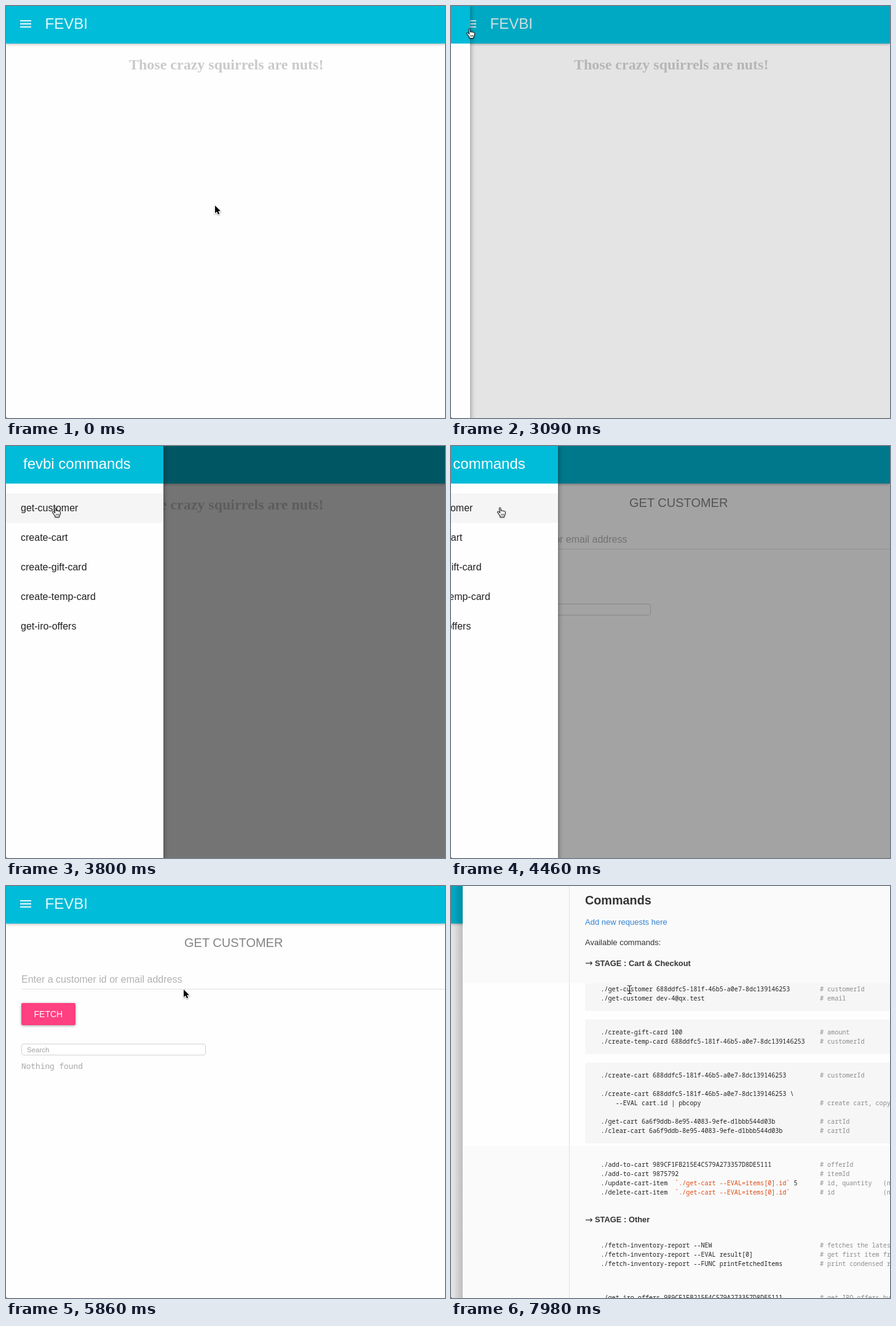
Recreate the animation shown at these times as an HTML page. Size 714 by 669 pixels, loop 8000 ms.

```html
<!DOCTYPE html>
<html lang="en">
<head>
<meta charset="utf-8">
<title>Command drawer</title>
<style>
  html, body { margin: 0; width: 100%; height: 100%; overflow: hidden; background: #fefefe; }
  svg { display: block; width: 714px; height: 669px; }
  text { font-family: "Liberation Sans", Arial, sans-serif; white-space: pre; }
  .title { font-size: 24px; fill: #fff; }
  .items { font-size: 16px; fill: #212121; }
  .serif { font: bold 24px "Liberation Serif", Times, serif; fill: #cacaca; }
  .mono { font-family: "Noto Sans Mono", monospace; }
  .doc { font-size: 13px; fill: #333; }
  .bold { font-size: 12.9px; font-weight: bold; }
  .pointer { font: 15px "DejaVu Sans", sans-serif; fill: #333; }
  .code { font-size: 10.07px; font-weight: 500; fill: #222; }
  .code .eval { fill: #dd4a14; }
  .code.note { fill: #8c8c8c; }
  .bar { fill: #00bcd9; }
  .bar.raised { filter: drop-shadow(0 1px 2px rgba(0, 0, 0, .3)); }
  .panel { fill: #fefefe; filter: drop-shadow(0 3px 4px rgba(0, 0, 0, .45)); }
  .button { fill: #ff4081; filter: drop-shadow(0 1px 2px rgba(0, 0, 0, .35)); }
  .cursor { filter: drop-shadow(0 1px 1px rgba(0, 0, 0, .35)); }
</style>
</head>
<body>
<svg viewBox="0 0 714 669">
  <defs>
    <linearGradient id="edgeShade">
      <stop offset="0" stop-opacity="0"/>
      <stop offset="1" stop-opacity=".16"/>
    </linearGradient>
  </defs>

  <rect width="714" height="669" fill="#fefefe"/>
  <text id="home" class="serif" x="200" y="103">Those crazy squirrels are nuts!</text>

  <g id="customer">
    <text x="290" y="99" font-size="20" fill="#838383">GET CUSTOMER</text>
    <text x="25" y="157" font-size="16" fill="#b2b2b2">Enter a customer id or email address</text>
    <rect x="25" y="167" width="689" height="1" fill="#e0e0e0"/>
    <rect class="button" x="25" y="190" width="88" height="36" rx="2"/>
    <text x="45.5" y="213" font-size="14" fill="#fff">FETCH</text>
    <rect x="25.5" y="256.5" width="299" height="18" rx="3.5" fill="#fff" stroke="#d2d2d2"/>
    <text x="34" y="270" font-size="11.5" fill="#a0a0a0">Search</text>
    <text class="mono" x="25" y="297" font-size="12.8" font-weight="500" fill="#a8a8a8">Nothing found</text>
  </g>

  <rect class="bar raised" width="714" height="61"/>
  <path d="M23 24h18M23 29h18M23 34h18" stroke="#fff" stroke-width="2" opacity=".9"/>
  <text class="title" x="63.5" y="37" opacity=".9">FEVBI</text>

  <rect id="dim" width="714" height="669"/>

  <g id="drawer">
    <rect class="panel" y="-10" width="256" height="690"/>
    <rect class="bar" width="256" height="61"/>
    <text class="title" x="28" y="37">fevbi commands</text>
    <rect id="hover" y="77" width="256" height="48" fill="#f5f5f5"/>
    <g id="items" class="items"></g>
  </g>

  <g id="docs">
    <rect x="4" width="15" height="669" fill="url(#edgeShade)"/>
    <rect x="19" width="695" height="669" fill="#fafafa"/>
    <rect x="19" y="158" width="695" height="264" fill="#fefefe"/>
    <rect x="192" width="1" height="669" fill="#ddd"/>
    <g fill="#f6f6f6">
      <rect x="218" y="158" width="510" height="45" rx="3"/>
      <rect x="218" y="217" width="510" height="56" rx="3"/>
      <rect x="218" y="287" width="510" height="131" rx="3"/>
    </g>
    <text class="doc bold" x="218" y="30" style="font-size:19.8px">Commands</text>
    <text class="doc" x="218" y="63" style="fill:#3583d0">Add new requests here</text>
    <text class="doc" x="218" y="96">Available commands:</text>
    <text class="pointer" x="218" y="130">→</text>
    <text class="doc bold" x="234" y="129.5">STAGE : Cart &amp; Checkout</text>
    <text class="pointer" x="218" y="546.5">→</text>
    <text class="doc bold" x="234" y="546">STAGE : Other</text>
    <g id="listing"></g>
  </g>

  <rect y="668" width="1" height="1"/>

  <g id="arrow" class="cursor">
    <path d="M0 0V12.5L3 9.8 5 14.3 7.2 13.4 5.2 9H9Z" stroke="#fff" stroke-width="2" paint-order="stroke"/>
  </g>
  <g id="hand" class="cursor">
    <g transform="translate(-5 -1)" fill="#fff" stroke="#000" stroke-linejoin="round">
      <path d="M4.8 10L2.6 7.7C1.2 6.5 0 7.6 1 9L4.8 14.2V16.3H11.6V14.6C13 12.6 13.4 11 13.4 8.3C13.4 6.5 11.6 6.3 11.2 7.4C11 5.8 9 5.6 8.7 6.8C8.4 5.5 6.8 5.5 6.5 6.5L5.7 1.9C5.3 .2 3.3 .5 3.6 2.2Z"/>
      <path d="M6.8 11v3M8.7 11v3M10.6 11v3" stroke-width=".7"/>
    </g>
  </g>
  <g id="beam" fill="none">
    <path d="M-3.5 -6.5Q0 -6.5 0 -4.5Q0 -6.5 3.5 -6.5M-3.5 7Q0 7 0 5Q0 7 3.5 7M0 -4.5V5M-2 2H2" stroke="#222" stroke-width="1.2"/>
  </g>
</svg>

<script>
const LOOP = 8000;
const el = id => document.getElementById(id);
const clamp = v => Math.min(1, Math.max(0, v));
const smooth = v => v * v * (3 - 2 * v);

const customerId = '688ddfc5-181f-46b5-a0e7-8dc139146253';
const cartId = '6a6f9ddb-8e95-4083-9efe-d1bbb544d03b';
const offerId = '989CF1FB215E4C579A273357D8DE5111';
const firstItem = '`./get-cart --EVAL=items[0].id`';
const listing = [
  [170.5, `./get-customer ${customerId}`, 'customerId'],
  [185.5, './get-customer dev-4@qx.test', 'email'],
  [240.5, './create-gift-card 100', 'amount'],
  [255.5, `./create-temp-card ${customerId}`, 'customerId'],
  [310.5, `./create-cart ${customerId}`, 'customerId'],
  [340.5, `./create-cart ${customerId} \\`],
  [355.5, '    --EVAL cart.id | pbcopy', 'create cart, copy id'],
  [385.5, `./get-cart ${cartId}`, 'cartId'],
  [400.5, `./clear-cart ${cartId}`, 'cartId'],
  [455.5, `./add-to-cart ${offerId}`, 'offerId'],
  [470.5, './add-to-cart 9875792', 'itemId'],
  [485.5, `./update-cart-item  ${firstItem} 5`, 'id, quantity   (note)'],
  [500.5, `./delete-cart-item  ${firstItem}`, 'id             (note)'],
  [586.5, './fetch-inventory-report --NEW', 'fetches the latest'],
  [601.5, './fetch-inventory-report --EVAL result[0]', 'get first item from'],
  [616.5, './fetch-inventory-report --FUNC printFetchedItems', 'print condensed report'],
  [671.5, `./get-iro-offers ${offerId}`, 'get IRO offers by id'],
];
el('listing').innerHTML = listing.map(([y, code, note]) =>
  `<text class="mono code" x="243.5" y="${y}">${code.replace(/`.*`/, '<tspan class="eval">$&</tspan>')}</text>` +
  (note ? `<text class="mono code note" x="600" y="${y}"># ${note}</text>` : '')).join('');

el('items').innerHTML =
  ['get-customer', 'create-cart', 'create-gift-card', 'create-temp-card', 'get-iro-offers']
    .map((name, i) => `<text x="24" y="${106 + 48 * i}">${name}</text>`).join('');

// The picture only refreshes at these moments.
const spread = (from, to, count) =>
  Array.from({ length: count }, (_, i) => from + (to - from) * i / (count - 1));
const refreshes = [
  0, ...spread(660, 810, 3), ...spread(1110, 1710, 11),
  3090, 3140, 3230, 3320, 3400, 3480, 3560, 3680, 3800,
  4460, 4520, 4600, 4690, ...spread(5470, 5860, 7), 7770, 7870, 7980,
];
const snap = t => refreshes.findLast(step => step <= t);

// cubic-bezier(.23, 1, .32, 1)
function easeOut(x) {
  x = clamp(x);
  let low = 0, high = 1;
  for (let i = 0; i < 24; i++) {
    const u = (low + high) / 2, v = 1 - u;
    if (.69 * u * v * v + .96 * u * u * v + u ** 3 < x) low = u; else high = u;
  }
  return 1 - (1 - low) ** 3;
}

function openness(t, openAt, closeAt, duration) {
  if (t >= 4690) return 0;
  return t < closeAt ? easeOut((t - openAt) / duration) : 1 - easeOut((t - closeAt) / duration);
}

// start, end, x, y
const moves = [
  [585, 810, 133, 108],
  [1050, 1710, 30, 37],
  [3400, 3800, 80, 100],
  [5405, 5860, 289, 168],
];
function pointer(t) {
  let x = 340, y = 324;
  for (const [start, end, toX, toY] of moves) {
    const p = smooth(clamp((t - start) / (end - start)));
    x += (toX - x) * p;
    y += (toY - y) * p;
  }
  return [x, y];
}

const show = (id, visible) => { el(id).style.display = visible ? '' : 'none'; };
const place = (id, x, y = 0) => el(id).setAttribute('transform', `translate(${x} ${y})`);

function draw(t) {
  const onCustomer = t >= 4460;
  show('home', !onCustomer);
  show('customer', onCustomer);

  const open = openness(t, 3077, 4425, 450);
  show('drawer', open > 0);
  place('drawer', Math.floor(256 * (open - 1) + .001));

  const swiping = t >= 7770;
  el('dim').setAttribute('opacity', swiping ? .11 : .54 * openness(t, 3072, 4427, 400));
  show('docs', swiping);
  place('docs', Math.round(695 * (1 - clamp((t - 7720) / 260)) ** 2));

  const [x, y] = pointer(t);
  const onItem = t > 3400 && t < 5470 && y > 77;
  const kind = t >= 7980 ? 'beam' : onItem || (x < 56 && y < 53) ? 'hand' : 'arrow';
  show('hover', onItem);
  for (const id of ['arrow', 'hand', 'beam']) {
    show(id, id === kind);
    place(id, Math.round(x) + (id === 'beam' ? 1.5 : 0), Math.round(y));
  }
}

const began = performance.now();
function tick() {
  draw(snap((performance.now() - began) % LOOP));
  requestAnimationFrame(tick);
}
tick();
</script>
</body>
</html>
```
